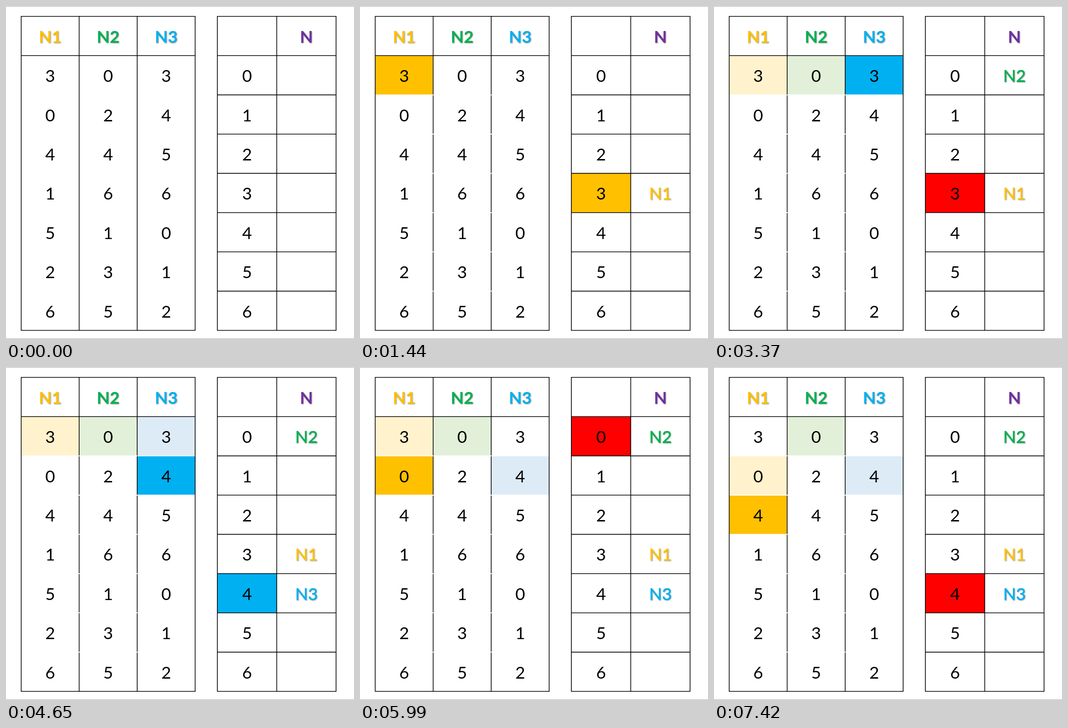
These frames come from a looping animation (764x733 px, 8000 ms). An HTML page:

```html
<!DOCTYPE html>
<html lang="en">
<head>
<meta charset="utf-8">
<title>Choice table</title>
<style>
  html, body { margin: 0; width: 100%; height: 100%; overflow: hidden; background: #fff; }
  svg { display: block; width: 100%; height: 100%; }
  text { font: 400 37px Lato, Carlito, sans-serif; text-anchor: middle; }
  .head { font-weight: 700; filter: drop-shadow(1.5px 1.5px 1px rgba(0, 0, 0, .45)); }
  .placed { stroke-width: .6; filter: drop-shadow(1.2px 1.2px .8px rgba(0, 0, 0, .4)); }
  .grid { fill: none; stroke: #000; stroke-width: 1.6; }
  .gaps { fill: none; stroke: #fff; stroke-width: 1.8; }
  .edge { fill: none; stroke: #a6a6a6; stroke-width: 1; }
</style>
</head>
<body>
<svg id="stage" viewBox="0 0 764 733"></svg>
<script>
const LOOP = 8000;
const TOP = 22.8, ROW = 86.4, ROWS = 8;
const LEFT_X = [33.4, 160.6, 288, 415.3];
const RIGHT_X = [464, 594.4, 724.6];
const TAKEN = '#ff0000';

const people = [
  { name: 'N1', color: '#ffc000', pale: '#fff2cc', picks: [3, 0, 4, 1, 5, 2, 6] },
  { name: 'N2', color: '#00b050', pale: '#e2f0d9', picks: [0, 2, 4, 6, 1, 3, 5] },
  { name: 'N3', color: '#00b0f0', pale: '#ddebf7', picks: [3, 4, 5, 6, 0, 1, 2] }
];

// Each turn: start time, person, and the position in that person's list.
const turns = [
  [500, 0, 0], [2060, 1, 0], [3370, 2, 0],
  [4650, 2, 1], [5990, 0, 1], [7420, 0, 2]
];

const stage = document.getElementById('stage');
const lineY = i => TOP + i * ROW;
const middle = (xs, i) => (xs[i] + xs[i + 1]) / 2;

function add(tag, attrs, content = '') {
  const el = document.createElementNS('http://www.w3.org/2000/svg', tag);
  for (const key in attrs) el.setAttribute(key, attrs[key]);
  el.textContent = content;
  return stage.appendChild(el);
}

function addCell(xs, col, row) {
  return add('rect', {
    x: xs[col], y: lineY(row + 1), width: xs[col + 1] - xs[col], height: ROW, fill: 'none'
  });
}

function addText(content, x, row, attrs = {}) {
  return add('text', { x, y: lineY(row) + 58, ...attrs }, content);
}

const horizontal = (xs, i) => `M${xs[0]} ${lineY(i)}H${xs[xs.length - 1]}`;
const vertical = x => `M${x} ${lineY(0)}V${lineY(ROWS)}`;
const range = n => [...Array(n).keys()];

const pickCells = people.map((p, col) => p.picks.map((_, row) => addCell(LEFT_X, col, row)));
const slotCells = range(7).map(row => addCell(RIGHT_X, 0, row));

add('path', { class: 'grid', d: LEFT_X.slice(1, 3).map(vertical).join('') });
const gaps = add('path', {
  class: 'gaps', d: range(6).map(i => horizontal(LEFT_X, i + 2)).join('')
});
add('path', {
  class: 'grid', 'stroke-linecap': 'square',
  d: [LEFT_X[0], LEFT_X[3], ...RIGHT_X].map(vertical).join('') +
    [0, 1, ROWS].map(i => horizontal(LEFT_X, i)).join('') +
    range(ROWS + 1).map(i => horizontal(RIGHT_X, i)).join('')
});
add('path', { class: 'edge', d: 'M0 .5H764M0 732.5H764' });

people.forEach((p, col) => {
  const x = middle(LEFT_X, col);
  addText(p.name, x, 0, { class: 'head', fill: p.color });
  p.picks.forEach((n, row) => addText(n, x, row + 1));
});
addText('N', middle(RIGHT_X, 1), 0, { class: 'head', fill: '#7030a0' });
range(7).forEach(n => addText(n, middle(RIGHT_X, 0), n + 1));
const slotNames = range(7).map(n => addText('', middle(RIGHT_X, 1), n + 1, { class: 'placed' }));

const paint = (el, color) => el.setAttribute('fill', color);

function render(time) {
  const done = turns.filter(([start]) => time >= start);
  const owners = Array(7).fill(null);
  const latest = [];
  [...pickCells.flat(), ...slotCells].forEach(cell => paint(cell, 'none'));
  gaps.setAttribute('visibility', done.length ? 'visible' : 'hidden');

  done.forEach(([, who, row], i) => {
    const person = people[who];
    const slot = person.picks[row];
    if (i === done.length - 1) {
      latest.forEach((last, col) => paint(pickCells[col][last], people[col].pale));
      paint(pickCells[who][row], person.color);
      paint(slotCells[slot], owners[slot] ? TAKEN : person.color);
    }
    owners[slot] ??= person;
    latest[who] = row;
  });

  slotNames.forEach((label, n) => {
    const owner = owners[n];
    label.textContent = owner ? owner.name : '';
    paint(label, owner ? owner.color : 'none');
    label.setAttribute('stroke', owner ? owner.color : 'none');
  });
}

const began = performance.now();
function tick() {
  render((performance.now() - began) % LOOP);
  requestAnimationFrame(tick);
}
tick();
</script>
</body>
</html>
```
